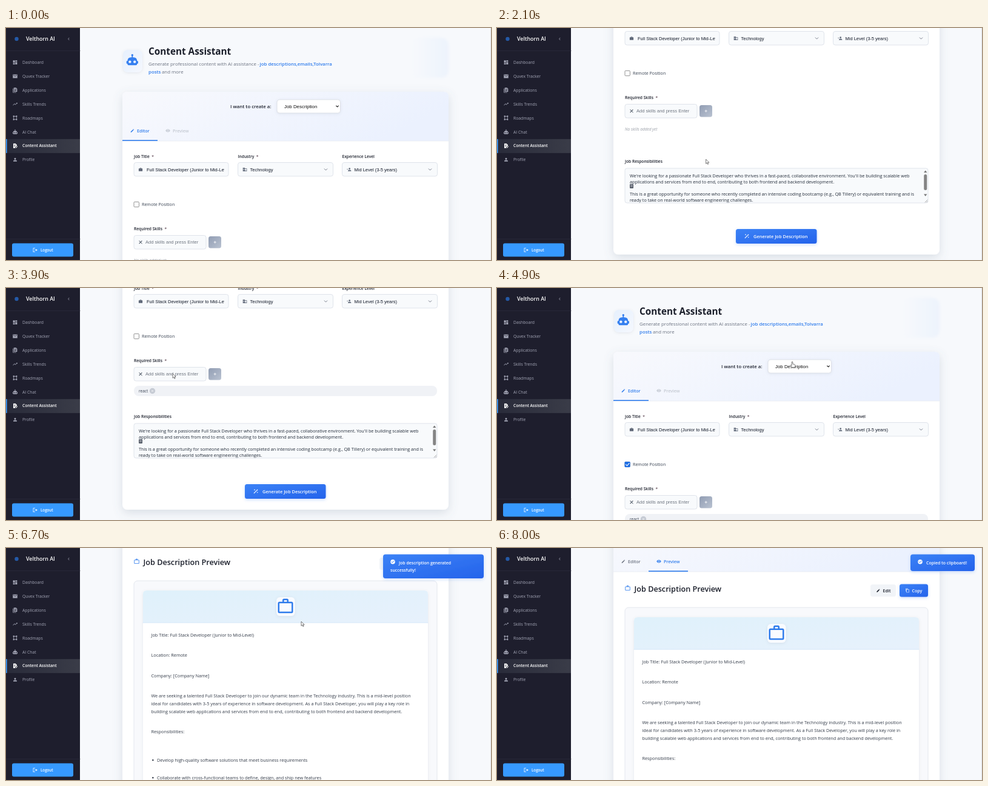
Animation of 800 by 382 pixels, one loop 8200 ms. Source, as an HTML page:

```html
<!DOCTYPE html>
<html lang="en">
<head>
<meta charset="utf-8">
<title>Content Assistant</title>
<style>
html, body { margin: 0; width: 100%; height: 100%; overflow: hidden; background: #f7f9fc; }
svg { display: block; width: 100vw; height: 100vh; }
text { font-family: "Open Sans", "Noto Sans", sans-serif; white-space: pre; }
.field { font-family: "Liberation Sans", Arial, sans-serif; }
.semi { font-weight: 600; }
.bold { font-weight: 700; }
.note { font-style: italic; }
</style>
</head>
<body>
<svg id="stage" viewBox="0 0 800 382" xmlns="http://www.w3.org/2000/svg"></svg>
<script>
const LOOP = 8200, STEP = 100;
const BLUE = '#2f7cec', INK = '#1b1f2b', GRAY = '#6b7280';

// Icons on a 24 unit grid
const icons = {
  grid: 'M3 13h8V3H3zM3 21h8v-6H3zM13 21h8V11h-8zM13 3v6h8V3z',
  mail: 'M2 4h20v16H2zM20 8V6l-8 5-8-5v2l8 5z',
  docs: 'M6 1h10l5 5v13H6zM9 9h9V7H9zM9 13h9v-2H9zM9 17h6v-2H9zM2 5h2v16h13v2H2z',
  trend: 'M16 6l2.3 2.3-4.9 4.9-4-4L2 16.6 3.4 18l6-6 4 4 6.3-6.3L22 12V6z',
  map: 'M3 2h6v6H7v8h2v6H3v-6h2V8H3zM15 2h6v6h-2v8h2v6h-6v-6h2V8h-2zM9 4h6v2H9zM9 18h6v2H9z',
  robot: 'M12 1a2 2 0 0 1 1 3.700V7h1q7 0 7 7h1q1 0 1 1v3q0 1-1 1h-1v1q0 2-2 2H5q-2 0-2-2v-1H2q-1 0-1-1v-3q0-1 1-1h1q0-7 7-7h1V4.700A2 2 0 0 1 12 1zM7.500 13a2.500 2.500 0 1 0 0 5 2.500 2.500 0 0 0 0-5zM16.500 13a2.500 2.500 0 1 0 0 5 2.500 2.500 0 0 0 0-5z',
  note: 'M4 2h10l6 6v3l-8 8v3H4zM7 10h8V8H7zM7 14h5v-2H7zM14 20l7-7 2 2-7 7h-2z',
  person: 'M12 12a4 4 0 1 0 0-8 4 4 0 0 0 0 8zM12 14c-3 0-8 1.3-8 4v2h16v-2c0-2.7-5-4-8-4z',
  pencil: 'M3 17.2V21h3.8L17.8 9.9l-3.7-3.7zM20.7 7l-3.7-3.7-1.9 1.8 3.8 3.8z',
  eye: 'M12 4.5C7 4.5 2.7 7.6 1 12c1.7 4.4 6 7.5 11 7.5s9.3-3.1 11-7.5c-1.7-4.4-6-7.5-11-7.5zM12 17a5 5 0 1 1 0-10 5 5 0 0 1 0 10zM12 9a3 3 0 1 0 0 6 3 3 0 0 0 0-6z',
  work: 'M4 6h4V4q0-2 2-2h4q2 0 2 2v2h4q2 0 2 2v11q0 2-2 2H4q-2 0-2-2V8q0-2 2-2zM10 6h4V4h-4z',
  bag: 'M4 6h4V4q0-2 2-2h4q2 0 2 2v2h4q2 0 2 2v11q0 2-2 2H4q-2 0-2-2V8q0-2 2-2zM10 6h4V4h-4zM4 8v11h16V8z',
  office: 'M2 3h10v4h10v14H2zM4 5v2h2V5zM8 5v2h2V5zM4 9v2h2V9zM8 9v2h2V9zM4 13v2h2v-2zM8 13v2h2v-2zM4 17v2h2v-2zM12 9v10h8V9zM14 11h3v2h-3zM14 15h3v2h-3z',
  level: 'M14 12a4 4 0 1 0 0-8 4 4 0 0 0 0 8zM14 14c-3 0-8 1.3-8 4v2h16v-2c0-2.7-5-4-8-4zM1 10h6v2H1z',
  tools: 'M3 5l2-2 7 7 6-7 3 3-7 6 7 7-2 2-7-7-6 7-3-3 7-6z',
  wand: 'M3 19L15 7l2 2L5 21zM18 2l1 3 3 1-3 1-1 3-1-3-3-1 3-1zM7 2l1 2 2 1-2 1-1 2-1-2-2-1 2-1zM19 13l1 2 2 1-2 1-1 2-1-2-2-1 2-1z',
  exit: 'M3 3h9v2H5v14h7v2H3zM16 7l6 5-6 5v-4H9v-2h7z',
  copy: 'M2 1h14v2H4v14H2zM6 5h15v18H6zM8 7v14h11V7z',
  check: 'M12 2a10 10 0 1 0 0 20 10 10 0 0 0 0-20zM10 17l-5-5 1.5-1.5L10 14l7.5-7.5L19 8z'
};

const icon = (name, cx, cy, size, fill) =>
  `<path d="${icons[name]}" fill="${fill}" fill-rule="evenodd" transform="translate(${cx - size / 2} ${cy - size / 2}) scale(${size / 24})"/>`;
const text = (x, y, size, fill, str, cls = '') =>
  `<text x="${x}" y="${y}" font-size="${size}" fill="${fill}" class="${cls}">${str}</text>`;
const rect = (x, y, w, h, r, fill, more = '') =>
  `<rect x="${x}" y="${y}" width="${w}" height="${h}" rx="${r}" fill="${fill}" ${more}/>`;
const line = (d, stroke, w = 1) =>
  `<path d="${d}" fill="none" stroke="${stroke}" stroke-width="${w}" stroke-linecap="round" stroke-linejoin="round"/>`;
const chevron = (x, y, s = 2.3, color = GRAY, w = .9) => line(`M${x - s} ${y - s / 2}l${s} ${s}l${s} ${-s}`, color, w);
const group = (id, body) => `<g id="${id}">${body}</g>`;
const box = (x, y, w, h) => rect(x, y, w, h, 3.5, '#f8fafc', 'stroke="#d8dde6" stroke-width=".8"');
const grad = (id, a, b, dir = 'x2="1" y2="1"') =>
  `<linearGradient id="${id}" x1="0" y1="0" ${dir}><stop stop-color="${a}"/><stop offset="1" stop-color="${b}"/></linearGradient>`;
const shadow = (id, dy, blur, color, alpha) =>
  `<filter id="${id}" x="-30%" y="-40%" width="160%" height="200%"><feDropShadow dx="0" dy="${dy}" stdDeviation="${blur}" flood-color="${color}" flood-opacity="${alpha}"/></filter>`;

const defs = '<defs>' +
  grad('head', '#f8f9fd', '#ebf1fe', 'x2="1" y2=".3"') +
  grad('primary', '#3b82f6', '#2563eb') +
  grad('pressed', '#2563eb', '#1d4ed8') +
  grad('muted', '#919db3', '#b9c2d1') +
  grad('banner', '#dff1fb', '#e7f1fc') +
  grad('tile', '#e6f0fd', '#f5f8fe') +
  grad('blob', '#f7f9fc', '#edf3fc', 'x2="1" y2="0"') +
  grad('active', '#292b3a', '#3a3c48', 'x2="1" y2="0"') +
  shadow('soft', 5, 8, '#64748b', .2) +
  shadow('lift', 1.5, 2.5, '#2563eb', .22) +
  shadow('faint', 1, 2, '#64748b', .14) +
  '<filter id="blur"><feGaussianBlur stdDeviation="2"/></filter>' +
  '<clipPath id="titleClip"><rect x="225" y="215" width="135" height="35"/></clipPath>' +
  '<clipPath id="areaClip"><rect x="211" y="447" width="490" height="56.5"/></clipPath></defs>';

function sidebar() {
  const items = [['grid', 'Dashboard'], ['mail', 'Quvex Tracker'], ['docs', 'Applications'], ['trend', 'Skills Trends'],
    ['map', 'Roadmaps'], ['robot', 'AI Chat'], ['note', 'Content Assistant'], ['person', 'Profile']];
  const rows = items.map(([name, label], i) => {
    const y = 56.5 + i * 22.9, on = i === 6, color = on ? '#fff' : '#a3a5b5';
    return (on ? rect(0, y - 11, 122, 23, 0, 'url(#active)') + rect(0, y - 11, 1.6, 23, 0, '#3699ff') : '') +
      icon(name, 15, y, 9, color) + text(27, y + 2.5, on ? 6.65 : 6.8, color, label, on ? 'semi' : '');
  }).join('');
  return rect(0, 0, 122, 382, 0, '#1e1e2d') +
    line('M0 37.5H122M0 347.5H122', '#2b2b3b', .8) +
    '<circle cx="17.5" cy="18" r="3.2" fill="#245aa8"/>' +
    text(33, 21.2, 8.9, '#fff', 'Velthorn AI', 'semi') +
    line('M104 16.3l-1.5 1.7l1.5 1.7', '#a3a5b5', .8) + rows +
    rect(10, 354.6, 101, 21.8, 3, '#3699ff') + icon('exit', 48, 365.5, 9, '#fff') +
    text(57, 368, 6.2, '#fff', 'Logout', 'semi');
}

function hero() {
  return rect(668, 16, 62, 66, 12, 'url(#blob)', 'filter="url(#blur)"') +
    rect(193, 36, 32, 37, 8, 'url(#tile)', 'filter="url(#faint)"') + icon('robot', 208.3, 52.6, 21, '#347ff0') +
    text(235, 44, 15.3, INK, 'Content Assistant', 'bold') +
    text(235, 61.5, 7.87, GRAY, 'Generate professional content with AI assistance -') +
    text(418.5, 61.5, 7.83, BLUE, 'job descriptions,emails,Tolvarra', 'semi') +
    text(235, 74.5, 7.83, BLUE, 'posts', 'semi') + text(257, 74.5, 7.87, GRAY, 'and more');
}

function cardHead() {
  return '<path d="M192 186V113q0-8 8-8H722q8 0 8 8V186z" fill="url(#head)"/>' +
    line('M192 186H730', '#e6eaf2', .8) +
    text(370, 132, 7.8, INK, 'I want to create a:', 'semi') +
    rect(447, 118, 104.5, 22, 4, '#fff', 'stroke="#d8dce4" stroke-width=".8" filter="url(#faint)"') +
    text(459, 131.8, 7.9, '#111', 'Job Description', 'field') + chevron(546.5, 129, 1.8, '#111', 1.1) +
    group('tabEdit', icon('pencil', 208.5, 169, 7.5, 'currentColor') + text(216, 171.8, 7.15, 'currentColor', 'Editor', 'semi')) +
    group('tabView', icon('eye', 267, 169, 8, 'currentColor') + text(275, 171.8, 7, 'currentColor', 'Preview', 'semi')) +
    '<rect id="tabLine" y="184.4" height="1.6" fill="#2f7cec"/>';
}

function editor() {
  const label = (x, y, str, star) => text(x, y, 6.65, INK, str + (star ? '  <tspan fill="#6b5560">*</tspan>' : ''), 'semi');
  const picker = (x, name, str) => box(x, 221.5, 157, 22.5) + icon(name, x + 11.5, 233, 8, '#5f6878') +
    text(x + 20, 235.5, 7.5, '#111827', str, 'field') + chevron(x + 145, 233);
  const lines = [
    [462, "We're looking for a passionate Full Stack Developer who thrives in a fast-paced, collaborative environment. You'll be building scalable web"],
    [472, 'applications and services from end to end, contributing to both frontend and backend development.'],
    [492, 'This is a great opportunity for someone who recently completed an intensive coding bootcamp (e.g., QB Tillery) or equivalent training and is'],
    [502, 'ready to take on real-world software engineering challenges.']
  ].map(([y, str]) => text(219, y, 7.24, '#222b38', str)).join('');

  const lower = label(211, 438, 'Job Responsibilities') + box(211, 447, 500, 57) +
    `<g clip-path="url(#areaClip)">${lines}${rect(219, 473, 6, 7, 1, '#555c68')}${line('M220.5 475h3M220.5 477h3', '#e5e7eb', .7)}</g>` +
    rect(704.2, 457, 5, 26, 2.5, '#858585') +
    '<path d="M704 454l2.7-3.5 2.7 3.5zM704 489.5h5.4l-2.7 3.5z" fill="#777"/>' +
    line('M706 503l4-4M708.5 503l1.5-1.5', '#777', .6) +
    group('generate', '<rect id="genBox" x="394" y="547" width="133.5" height="24" rx="3.5" filter="url(#lift)"/>' +
      icon('wand', 412, 559, 9.5, '#fff') + text(423, 561.7, 7.43, '#fff', 'Generate Job Description', 'semi'));

  return label(211, 213.5, 'Job Title', true) + label(382.5, 213.5, 'Industry', true) + label(554.5, 213.5, 'Experience Level') +
    box(211, 221.5, 156, 22.5) + icon('work', 222, 233, 7.5, '#5f6878') +
    `<g clip-path="url(#titleClip)">${text(232, 235.5, 7.5, '#111827', 'Full Stack Developer (Junior to Mid-Level)', 'field')}</g>` +
    picker(382.5, 'office', 'Technology') + picker(554.5, 'level', 'Mid Level (3-5 years)') +
    rect(211, 286.3, 8.4, 8.4, 1.3, '#fff', 'stroke="#777" stroke-width=".8"') +
    group('tick', rect(210.6, 286, 9, 9, 1.3, '#1f6fe5') + line('M212.5 290.6l2 2l3.6-4', '#fff', 1.1)) +
    text(224, 293.2, 7.1, '#374151', 'Remote Position') +
    label(211, 333.3, 'Required Skills', true) + box(211, 341.5, 119, 22.5) + icon('tools', 222, 352.7, 7.5, '#4b5563') +
    '<text id="skill" x="230" y="355.2" font-size="7.55" class="field"/>' +
    rect(334, 343, 21, 19.5, 3.5, 'url(#muted)') + line('M343 352.7h3.4M344.7 351v3.4', '#fff', .8) +
    group('noSkills', text(211, 385.3, 6.5, '#9a9fa8', 'No skills added yet', 'note')) +
    group('chip', rect(211, 372, 500, 17, 8, '#f0f2f6') + text(219, 383, 6.5, '#374151', 'react') +
      '<circle cx="241.5" cy="380.5" r="4.7" fill="#c6cbd4"/>' + line('M240.3 379.3l2.4 2.4M242.7 379.3l-2.4 2.4', '#fff', .7)) +
    group('lower', lower);
}

function preview() {
  const lines = [
    [334, 'Job Title: Full Stack Developer (Junior to Mid-Level)'],
    [367.5, 'Location: Remote'],
    [401, 'Company: [Company Name]'],
    [434, 'We are seeking a talented Full Stack Developer to join our dynamic team in the Technology industry. This is a mid-level position'],
    [447, 'ideal for candidates with 3-5 years of experience in software development. As a Full Stack Developer, you will play a key role in'],
    [460, 'building scalable web applications and services from end to end, contributing to both frontend and backend development.'],
    [493, 'Responsibilities:']
  ].map(([y, str]) => text(239.5, y + 2.6, 7.29, '#333b48', str)).join('');
  const bullets = [
    [540, 'Develop high-quality software solutions that meet business requirements'],
    [569, 'Collaborate with cross-functional teams to define, design, and ship new features']
  ].map(([y, str]) => `<circle cx="242.3" cy="${y + .3}" r="1.2" fill="#333b48"/>` + text(249, y + 2.6, 7.29, '#333b48', str)).join('');
  return icon('bag', 215.5, 213, 10, BLUE) + text(226.5, 218.7, 12.65, INK, 'Job Description Preview', 'semi') +
    rect(616, 207, 42, 20, 3.5, '#f1f4f8') + icon('pencil', 629, 217, 7, INK) + text(636.5, 219.7, 7, INK, 'Edit', 'semi') +
    rect(664, 206.5, 47, 21, 3.5, 'url(#primary)', 'filter="url(#lift)"') + icon('copy', 677, 217, 7, '#fff') +
    text(684.5, 219.7, 7, '#fff', 'Copy', 'semi') +
    rect(211, 245, 500, 500, 6, '#f8f9fc', 'stroke="#e3e7ee"') +
    rect(226, 261, 470, 480, 6, '#fff', 'filter="url(#faint)"') +
    '<path d="M226 314V267q0-6 6-6H690q6 0 6 6V314z" fill="url(#banner)"/>' + line('M226 314H696', '#cfe3f7', .8) +
    rect(446, 272, 30.5, 31, 6, '#f9fbff', 'filter="url(#faint)"') + icon('bag', 461, 287, 30, BLUE) + lines + bullets;
}

const toast = (id, x, w, h, lines) => group(id,
  rect(x, 10.5, w, h, 4, 'url(#primary)', 'filter="url(#lift)"') + icon('check', x + 16, 22.7, 9, '#fff') +
  lines.map(([dx, y, str]) => text(x + dx, y, 6.95, '#fff', str, 'semi')).join(''));

const svg = document.getElementById('stage');
svg.innerHTML = defs + rect(122, 0, 678, 382, 0, '#f7f9fc') +
  group('page', hero() + '<rect id="card" x="192" y="105" width="538" rx="8" fill="#fff" filter="url(#soft)"/>' +
    cardHead() + group('editor', editor()) + group('preview', preview())) +
  line('M799.5 0V382', '#d9dde4', .8) + sidebar() +
  toast('done', 622, 166, 39.5, [[26, 27, 'Job description generated'], [12, 38.5, 'successfully!']]) +
  toast('copied', 682, 106, 27.5, [[26, 27, 'Copied to clipboard!']]) +
  group('arrow', '<path d="M0 0V7.3l1.7-1.6 1.2 2.6 1.2-.5-1.2-2.6h2.3z" fill="#fff" stroke="#444" stroke-width=".7"/>') +
  group('hand', '<path d="M-.9 .9q.9-1.5 1.8 0v3.3l3.2.8q1 .4.8 1.5l-.7 3.3h-4.4l-2.7-3.3q.2-1.3 1.6-.5l.4.5z" fill="#fff" stroke="#444" stroke-width=".7"/>');

const el = {};
svg.querySelectorAll('[id]').forEach(node => el[node.id] = node);
const show = (id, on) => el[id].setAttribute('display', on ? 'inline' : 'none');
const move = (id, x, y) => el[id].setAttribute('transform', `translate(${x} ${y})`);

// Eased value from keys [time, value]
function at(keys, t) {
  const i = keys.findIndex(k => k[0] > t);
  if (i === 0) return keys[0][1];
  if (i < 0) return keys[keys.length - 1][1];
  const [t0, a] = keys[i - 1], [t1, b] = keys[i], p = (t - t0) / (t1 - t0);
  return a + (b - a) * p * p * (3 - 2 * p);
}

const scrollKeys = [[300, 0], [900, 221], [1900, 221], [2300, 211], [4400, 211], [4800, 0], [5800, 0],
  [6200, 63], [6700, 191], [7100, 191], [7600, 147]];
const cursorKeys = [[800, 440, 360], [1100, 468, 332], [1600, 468, 332], [2400, 287.5, 162.5], [2900, 287.5, 162.5],
  [3100, 275, 141], [3900, 275, 141], [4200, 215, 79], [4400, 215, 79], [4900, 487, 121], [7100, 487, 121], [7600, 688, 70]];
const xKeys = cursorKeys.map(k => [k[0], k[1]]), yKeys = cursorKeys.map(k => [k[0], k[2]]);
const within = (t, a, b) => t >= a && t < b;

function draw(t) {
  const viewing = t >= 6400, added = t >= 3800, shift = added ? -13 : 0;
  move('page', 0, -at(scrollKeys, t));
  show('editor', !viewing);
  show('preview', viewing);
  el.card.setAttribute('height', viewing ? 660 : 484 + shift);
  el.tabEdit.setAttribute('color', viewing ? GRAY : BLUE);
  el.tabView.setAttribute('color', viewing ? BLUE : '#c3c8d1');
  el.tabLine.setAttribute('x', viewing ? 250 : 192);
  el.tabLine.setAttribute('width', viewing ? 65 : 58);

  const typed = added ? '' : 'react'.slice(0, Math.max(0, (t - 3100) / STEP));
  el.skill.textContent = typed || 'Add skills and press Enter';
  el.skill.setAttribute('fill', typed ? '#111827' : '#6f7680');
  show('tick', t >= 4300);
  show('chip', added);
  show('noSkills', !added);
  move('lower', 0, shift);

  const hover = within(t, 1000, 1800);
  move('generate', 0, hover ? -1 : 0);
  el.genBox.setAttribute('fill', `url(#${hover ? 'pressed' : 'primary'})`);
  show('done', within(t, 6500, 7500));
  show('copied', t >= 7700);

  const pointing = hover || within(t, 4200, 4500) || within(t, 4800, 6000) || t >= 7500;
  const visible = within(t, 800, 7800);
  for (const id of ['arrow', 'hand']) {
    show(id, visible && pointing === (id === 'hand'));
    move(id, at(xKeys, t), at(yKeys, t));
  }
}

const start = performance.now();
function tick() {
  const t = (performance.now() - start) % LOOP;
  draw(Math.floor(t / STEP) * STEP);
  requestAnimationFrame(tick);
}
draw(0);
requestAnimationFrame(tick);
</script>
</body>
</html>
```
